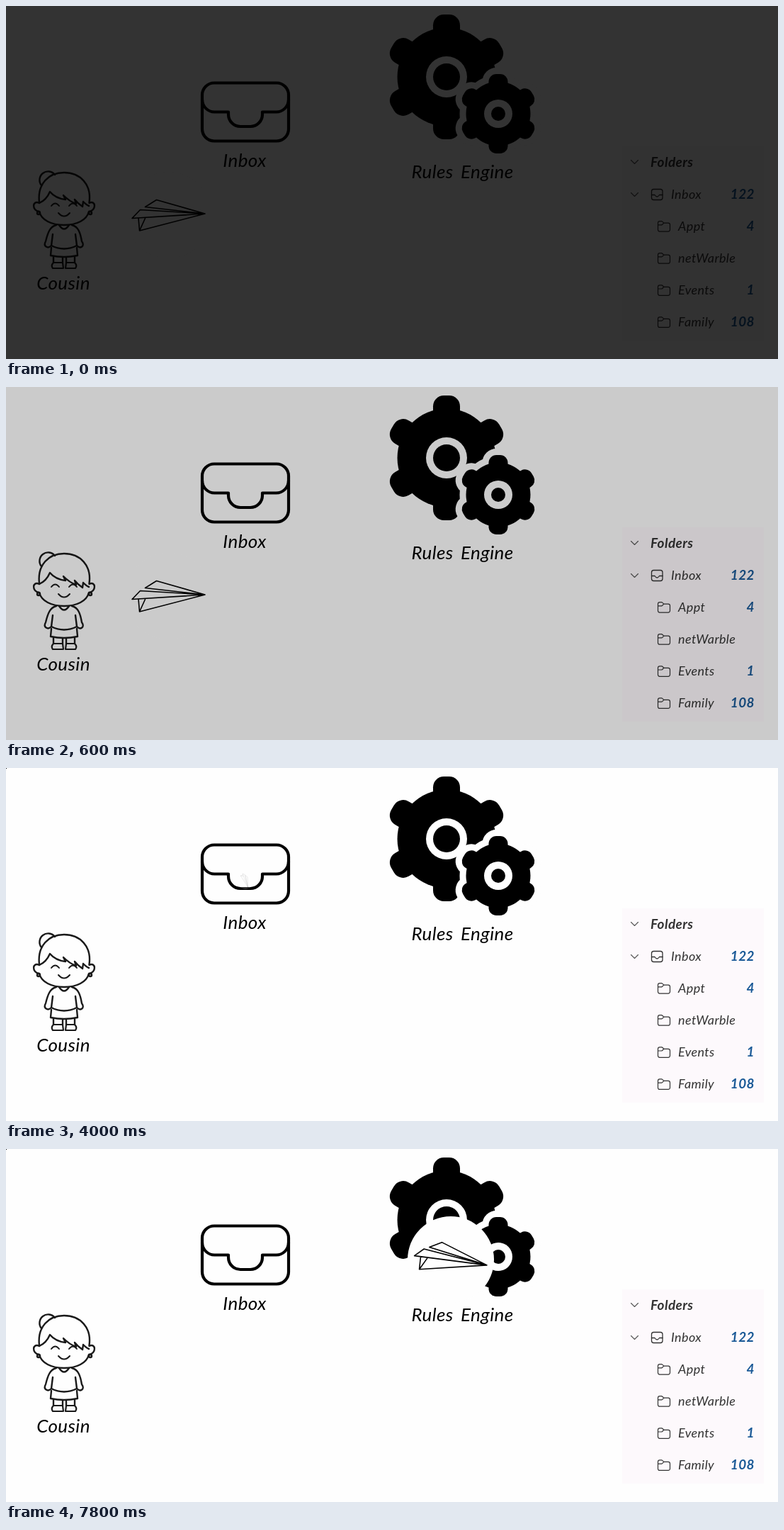
Animation of 1090 by 498 pixels, one loop 8 s. Source, as an HTML page:

```html
<!DOCTYPE html>
<html lang="en">
<head>
<meta charset="utf-8">
<title>Mail rules</title>
<style>
  html, body { margin: 0; width: 100%; height: 100%; overflow: hidden; background: #fefefe; }
  svg { display: block; width: 100%; height: 100%; }
  text { font-family: Lato, "Open Sans", sans-serif; font-style: italic; letter-spacing: .4px; }
  .label { font-size: 26px; text-anchor: middle; word-spacing: 4px; }
  .panel text { font-size: 18px; fill: #333; }
  .panel .head { font-size: 19px; font-weight: 700; }
  .panel .count { font-size: 19px; font-weight: 700; fill: #1b5a97; text-anchor: end; }
  .line { fill: none; stroke: #000; stroke-linecap: round; stroke-linejoin: round; }
  .panel .line, #folder .line { stroke: #333; }
</style>
</head>
<body>
<svg viewBox="0 0 1090 498">
  <defs>
    <g id="chevron"><path class="line" d="M-5 -2.5 L0 2.5 L5 -2.5" stroke-width="1.1" style="stroke:#555"/></g>
    <g id="folder">
      <path class="line" d="M-8.5 -5 a2.5 2.5 0 0 1 2.5 -2.5 h3 l3 2.5 h6 a2.5 2.5 0 0 1 2.5 2.5 v7 a2.5 2.5 0 0 1 -2.5 2.5 h-12 a2.5 2.5 0 0 1 -2.5 -2.5 z M-8.5 -2.3 h5.5 l3 -2.7" stroke-width="1.2"/>
    </g>
  </defs>
  <rect width="1090" height="498" fill="#fefefe"/>

  <g class="line" stroke-width="4.2" style="stroke-linecap:butt">
    <rect x="277" y="108.5" width="122" height="82" rx="17"/>
    <path d="M277 132 A17.5 17.5 0 0 0 294.5 149.5 H314 V153 A17 17 0 0 0 331 170 H345 A17 17 0 0 0 362 153 V149.5 H381.5 A17.5 17.5 0 0 0 399 132"/>
  </g>

  <g id="gears"></g>

  <g class="line" stroke-width="2.4" style="stroke:#1a1a1a">
    <path d="M50 253 A12 12 0 1 1 69 238"/>
    <path d="M47 277 C44 251 60 235 82 235 C105 235 121 252 117.5 277"/>
    <path d="M47 278 C54 275 59 269 62 262 C67 268 75 272 84 273 L81 267 C87 273 93 277 99 279 L97 273 C101 278 105 281 108 283 L109 276 C112 279 114 281 117 282"/>
    <path d="M47 278 C37 273 36 289 47 290 C50 302 64 309 82 309 C100 309 114 302 117 290 C128 289 127 273 117.5 278"/>
    <circle cx="46" cy="292" r="2"/>
    <circle cx="119" cy="292" r="2"/>
    <path d="M64 282 Q69.5 275 75 282 M89 282 Q94.5 275 100 282 M74 292 Q82 301 90 292" stroke-width="2"/>
    <path d="M75 309 Q82 320 89 309"/>
    <path d="M71 309 C62 311 59 320 56 332 C52 339 59 343 64 338 L66 322 M93 309 C102 311 105 320 107 332 C112 339 105 343 100 338 L98 322"/>
    <path d="M64 338 Q82 347 100 338 M64 341 L63 352 Q82 356 101 352 L100 341"/>
    <path d="M67 354 V362 M80 355 V362 M85 355 V362 M97 354 V362"/>
    <path d="M67 362 H80 L81 370 H66 Q63 366 67 362 Z M85 362 H97 Q101 366 98 370 H84 Z" stroke-width="2.2"/>
  </g>

  <text class="label" x="337" y="227">Inbox</text>
  <text class="label" x="644.5" y="243">Rules Engine</text>
  <text class="label" x="81" y="400">Cousin</text>

  <g class="panel">
    <rect x="870" y="198" width="200" height="274" fill="#fdf9fc"/>
    <use href="#chevron" x="887.5" y="220"/>
    <use href="#chevron" x="887.5" y="266"/>
    <g class="line" stroke-width="1.3">
      <rect x="911.5" y="258.5" width="15.5" height="15" rx="3"/>
      <path d="M911.5 266.5 h4.500 q3.200 5 6.500 0 h4.500"/>
    </g>
    <text class="head" x="910" y="227">Folders</text>
    <g id="rows"></g>
  </g>

  <g id="plane">
    <circle r="61" fill="#fefefe"/>
    <path class="line" stroke-width="1.6" d="M51.5 -2 L-17 -21.5 L-33 -11.5 Z M51.5 -2 L-51.5 4.500 L-40 -7.5 Z M-42.5 4 L-41 22 L51.5 -2 M-33 4.500 L-41 22"/>
  </g>

  <rect id="dot" width="1" height="1"/>
  <rect id="shade" width="1090" height="498"/>
</svg>
<script>
const $ = id => document.getElementById(id);
const LOOP = 8000, STEP = 200;

// Gears: a disc with six rounded teeth, a pale ring and a hub.
function gear(x, y, body, reach, tooth, hole, hub, gap) {
  const teeth = [0, 60, 120, 180, 240, 300].map(a =>
    `<rect x="${-tooth / 2}" y="${-reach}" width="${tooth}" height="${reach - body * 0.5}" rx="${tooth * 0.4}" transform="rotate(${a})"/>`).join("");
  const shape = `<circle r="${body}"/>${teeth}`;
  const edge = gap ? `<g fill="#fefefe" stroke="#fefefe" stroke-width="${gap * 2}">${shape}</g>` : "";
  return `<g transform="translate(${x} ${y})">${edge}${shape}
    <circle r="${hole}" fill="#fefefe"/><circle r="${hub}"/></g>`;
}
$("gears").innerHTML =
  gear(622, 100, 69.5, 88, 38, 29, 19, 0) +
  gear(695, 152, 45.5, 56, 27, 20, 10, 9);

const rows = [["Inbox", 122], ["Appt", 4], ["netWarble", ""], ["Events", 1], ["Family", 108]];
$("rows").innerHTML = rows.map(([name, count], i) => {
  const y = 272 + 45.1 * i;
  const icon = i ? `<use href="#folder" x="929" y="${y - 6}"/>` : "";
  return `${icon}<text x="${i ? 949 : 939}" y="${y}">${name}</text>
    <text class="count" x="1057" y="${y}">${count}</text>`;
}).join("");

const ramp = (t, start, length) => Math.min(1, Math.max(0, (t - start) / length));
const smooth = u => (1 - Math.cos(Math.PI * u)) / 2;
const mix = (a, b, u) => a + (b - a) * u;

function draw(t) {
  $("shade").setAttribute("opacity", 0.8 * (1 - ramp(t, 0, 800)));
  $("dot").setAttribute("opacity", t >= 2800 ? 1 : 0);

  // Fly to the inbox and shrink away, then grow back and fly to the gears.
  let x, y, size, angle;
  if (t < 3400) {
    const u = smooth(ramp(t, 960, 1640));
    x = mix(229.5, 338, u);
    y = mix(295, 158.5, u);
    size = 1 - ramp(t, 1750, 1000);
    angle = 90 * (1 - size);
  } else {
    const u = smooth(ramp(t, 4800, 1960));
    x = mix(338, 628, u);
    y = mix(158.5, 156, u);
    size = ramp(t, 3800, 1000);
    angle = 90 * (1 - size) + 11 * Math.pow(Math.max(0, t - 7400) / 400, 2);
  }
  $("plane").setAttribute("transform", `translate(${x} ${y}) rotate(${angle}) scale(${size})`);
  $("plane").setAttribute("opacity", size);
}

const begin = performance.now();
function tick() {
  const t = (performance.now() - begin) % LOOP;
  draw(Math.floor(t / STEP) * STEP);
  requestAnimationFrame(tick);
}
tick();
</script>
</body>
</html>
```
